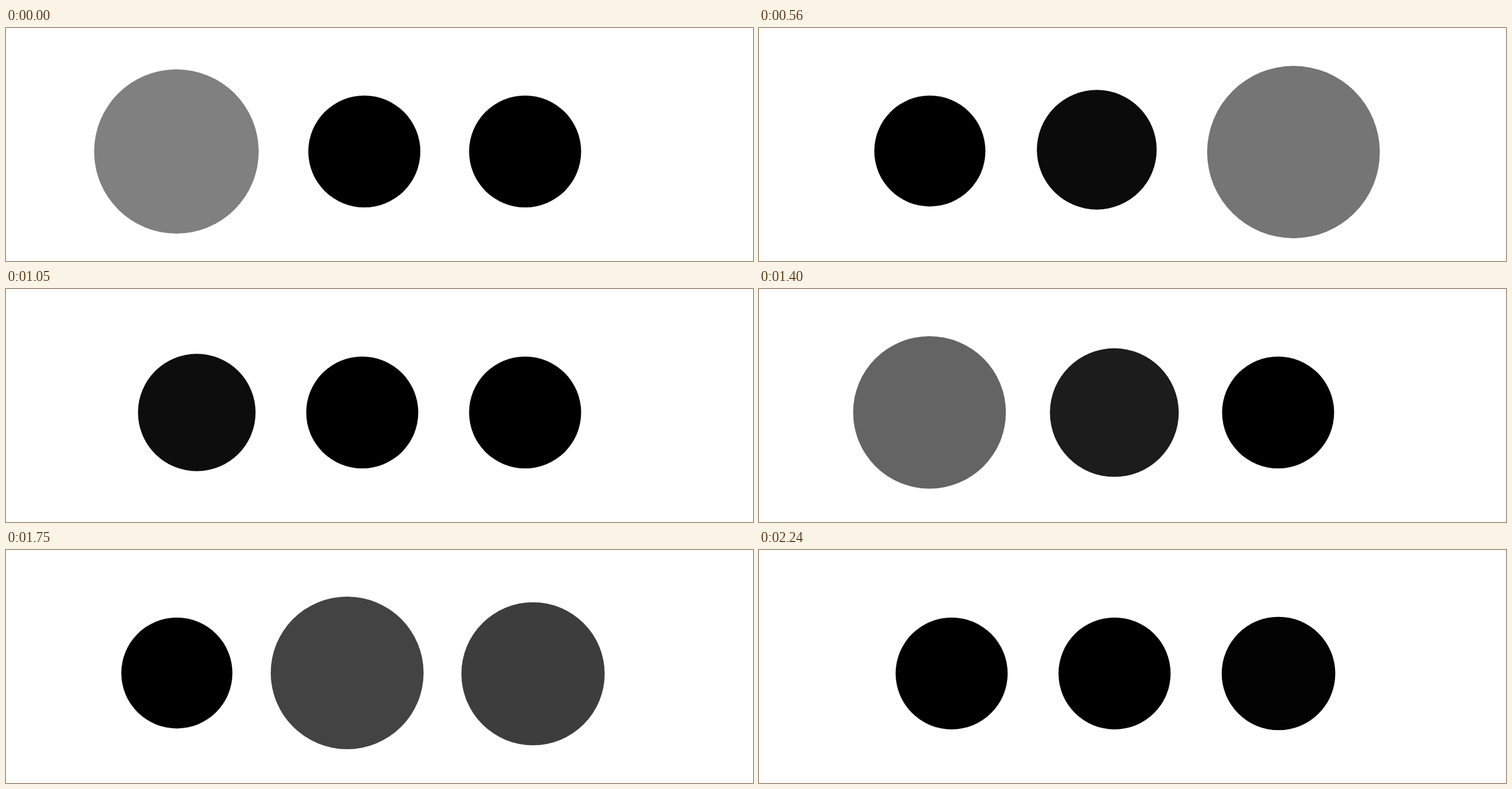
An HTML page that plays this animation: 1280 by 400 pixels, repeating every 2310 ms.

```html
<!DOCTYPE html>
<html lang="en">
<head>
<meta charset="utf-8">
<title>Three pulsing dots</title>
<style>
  html, body { margin: 0; width: 100%; height: 100%; overflow: hidden; background: #fff; }
  svg { display: block; width: 1280px; height: 400px; }
</style>
</head>
<body>
<svg viewBox="0 0 1280 400"><circle/><circle/><circle/></svg>
<script>
const LOOP = 2310, TICK = 70, MORPH = 300;

// Each pose lists its three dots as [cx, cy, r, grey].
const right = [889.5, 212, 96, 0];
const left = [292.75, 211.2, 95.2, 0];
const poses = [
  [[292, 212, 141, 128], [614, 212, 96, 0], right],
  [left, [590.75, 213, 161.1, 128], right],
  [left, [577.7, 208.65, 97.4, 0], [918.2, 213.1, 152.6, 128]],
  [[331, 212, 96, 0], [610, 212, 96, 0], right]
];

// Start times of the successive morphs, in ms.
const starts = [43, 364, 691, 1018, 1350, 1666, 1999];
const dots = document.querySelectorAll('circle');

// cubic-bezier(.25, .1, .25, 1), solved by bisection
function ease(x) {
  if (x <= 0) return 0;
  if (x >= 1) return 1;
  let lo = 0, hi = 1;
  for (let i = 0; i < 24; i++) {
    const m = (lo + hi) / 2;
    if (0.75 * m * (1 - m) + m ** 3 < x) lo = m; else hi = m;
  }
  const t = lo, u = 1 - t;
  return 0.3 * u * u * t + 3 * u * t * t + t ** 3;
}

function draw(time) {
  const t = Math.floor((time % LOOP) / TICK) * TICK;
  const step = Math.max(0, starts.filter(s => s <= t).length - 1);
  const p = ease((t - starts[step]) / MORPH);
  const from = poses[step % 4], to = poses[(step + 1) % 4];
  dots.forEach((dot, i) => {
    const [x, y, r, g] = from[i].map((v, k) => v + (to[i][k] - v) * p);
    const grey = Math.round(g);
    dot.setAttribute('cx', x);
    dot.setAttribute('cy', y);
    dot.setAttribute('r', r);
    dot.setAttribute('fill', `rgb(${grey},${grey},${grey})`);
  });
}

const begin = performance.now();
function run() {
  draw(performance.now() - begin);
  requestAnimationFrame(run);
}
run();
</script>
</body>
</html>
```
